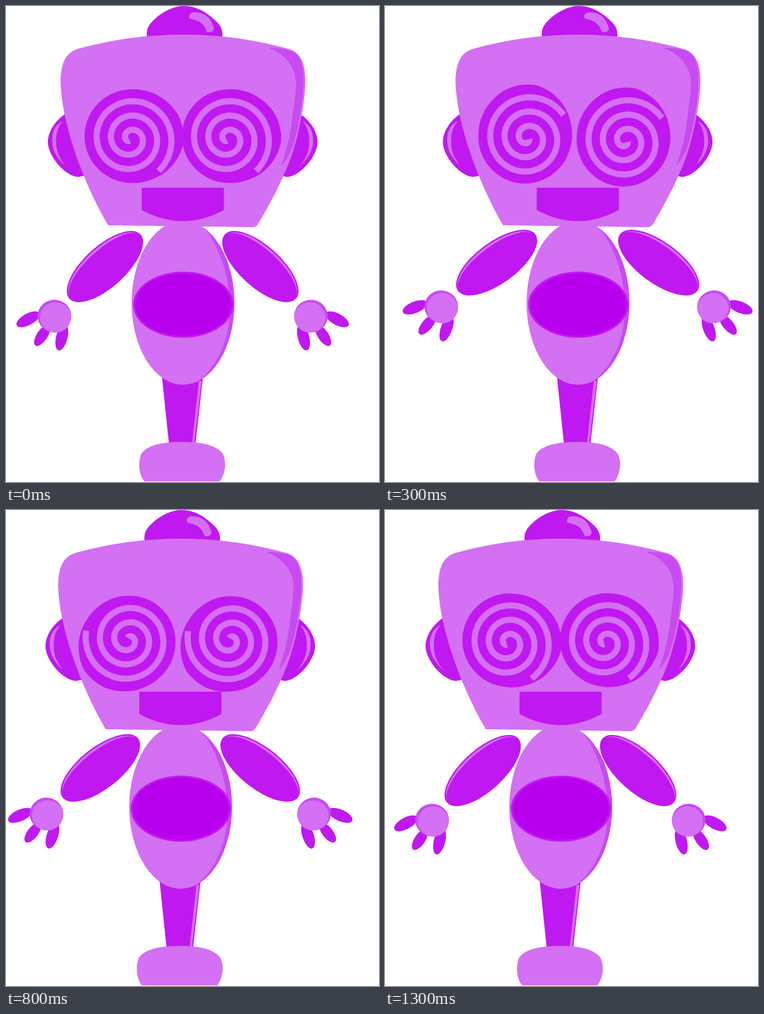
Animation, 588 px wide and 749 px high, one loop 1.35 s. Source, as an HTML page with a canvas:

```html
<!DOCTYPE html>
<html lang="en">
<head>
<meta charset="utf-8">
<title>Dizzy robot</title>
<style>
  html, body { margin: 0; width: 100%; height: 100%; overflow: hidden; background: #fff; }
  canvas { display: block; }
</style>
</head>
<body>
<canvas id="stage" width="588" height="749"></canvas>
<script>
const ctx = document.getElementById('stage').getContext('2d');
const LIGHT = '#d470f3', SHADE = '#c84af2', DARK = '#c018f0', BELLY = '#b800ee';
const LOOP = 1350, STEP = 50;
const RAD = Math.PI / 180;
const MIRROR = 557; // the robot is symmetric about x = MIRROR / 2

// Sideways sway as [time, offset]
const SWAY = [[0, 0], [200, 16.6], [300, 25.2], [350, 26.4], [600, 9], [800, -3.8],
  [1000, -15.2], [1050, -15.1], [1150, -10.8], [1300, -2], [1350, 0]];

// Eye rim as [angle from the spiral's end, radius]
const RIM = [[-320, 72], [-283, 71.5], [-229, 73.2], [-193, 74], [-140, 75.3],
  [-103, 78.5], [-75, 82], [-45, 83.5], [-13, 78.5], [15, 74], [40, 72]];

const shapes = {
  dome: new Path2D('M222 48C221 36 225 29 234 21C248 8 264 0 281 0C299 0 315 9 328 21C338 30 342 36 341 48Z'),
  domeGlint: new Path2D('M290 20C287 15 290 10 297 10C315 10 324 20 328 36C326 41 322 42 317 41C312 28 306 23 290 20Z'),
  ear: new Path2D('M98 167C80 177 66 196 66 214C66 236 93 268 114 269L124 267L112 200Z'),
  earGlint: new Path2D('M90 181C76 187 72 201 73 215C74 229 82 242 94 252C84 240 79 228 79 214C79 199 82 189 90 181Z'),
  head: new Path2D('M161 345C135 301 111 243 99 198C92 172 86 142 86 117C87 91 93 73 115 67Q195 45 280 45Q365 45 447 68C465 74 473 92 472 122C471 152 462 200 452 230C440 267 416 312 398 342Q395 348 388 348Z'),
  headShade: new Path2D('M414 66C431 66 446 68 455 73C466 82 470 98 469 126C466 165 459 202 450 226Q442 243 434 251C443 226 449 200 452 171Q458 130 457 118C455 93 440 76 414 66Z'),
  mouth: new Path2D('M214 286H343.5V321Q311 338.500 279 338.500Q246 338.500 214 321Z'),
  bodyShade: new Path2D('M302 338C350 380 390 525 297 596H380V338Z'),
  leg: new Path2D('M245.500 580H311L298.500 690H257Z'),
  legGlint: new Path2D('M304 590H308.500L296.500 690H293Z'),
  foot: new Path2D('M218 748C209 737 208 719 213 705C222 691 246 686 278 686C309 686 332 691 342 705C348 718 346 736 337 748Z')
};

function fill(path, color) {
  ctx.fillStyle = color;
  ctx.fill(path);
}

function ellipse(x, y, rx, ry, color, degrees = 0) {
  ctx.beginPath();
  ctx.ellipse(x, y, rx, ry, degrees * RAD, 0, 2 * Math.PI);
  ctx.fillStyle = color;
  ctx.fill();
}

function scoped(draw) {
  ctx.save();
  draw();
  ctx.restore();
}

function bothSides(draw) {
  scoped(draw);
  scoped(() => {
    ctx.translate(MIRROR, 0);
    ctx.scale(-1, 1);
    draw();
  });
}

function sample(keys, t) {
  const i = Math.max(1, keys.findIndex(key => key[0] >= t));
  const [t0, a] = keys[i - 1], [t1, b] = keys[i];
  return a + (b - a) * (t - t0) / (t1 - t0);
}

function polarPath(from, to, radiusAt) {
  const path = new Path2D();
  for (let angle = from; angle <= to; angle += 5) {
    const radius = radiusAt(angle);
    path.lineTo(radius * Math.cos(angle * RAD), radius * Math.sin(angle * RAD));
  }
  return path;
}

const rim = polarPath(-320, 40, angle => sample(RIM, angle));
const spiral = polarPath(-1020, 0, angle => 67.6 + 22.6 * angle / 360);

function drawEye(x, y, dx, dy, turn) {
  scoped(() => {
    ctx.translate(x, y);
    ctx.rotate(-turn * RAD);
    ctx.translate(dx, dy);
    ctx.rotate(49 * RAD);
    fill(rim, DARK);
    ctx.translate(1.2, 2.1);
    ctx.strokeStyle = LIGHT;
    ctx.lineWidth = 9.6;
    ctx.stroke(spiral);
  });
}

function drawArm(lift) {
  ctx.translate(214, 356);
  ctx.rotate(lift * RAD);
  ctx.translate(-214, -356);

  ellipse(156, 410, 75.5, 32.5, DARK, -42);
  scoped(() => {
    ctx.translate(156, 410);
    ctx.rotate(-42 * RAD);
    ctx.beginPath();
    ctx.ellipse(0, 0, 73, 30.3, 0, Math.PI, 2 * Math.PI);
    ctx.ellipse(0, 0, 73, 26.8, 0, 2 * Math.PI, Math.PI, true);
    ctx.fillStyle = LIGHT;
    ctx.fill();
  });

  ellipse(35, 493, 20.5, 9, DARK, -28);
  ellipse(57, 518.5, 19, 8.5, DARK, 124);
  ellipse(88, 521, 21.5, 9, DARK, 104);
  ellipse(76.3, 488, 26.5, 25.7, SHADE);
  ellipse(78, 490, 24.5, 23.7, LIGHT);
}

function drawBody() {
  fill(shapes.leg, DARK);
  fill(shapes.legGlint, LIGHT);
  fill(shapes.foot, LIGHT);
  ellipse(279, 467, 81, 129, LIGHT);
  scoped(() => {
    ctx.beginPath();
    ctx.ellipse(279, 467, 81, 129, 0, 0, 2 * Math.PI);
    ctx.clip();
    fill(shapes.bodyShade, SHADE);
  });
  ellipse(279.5, 470, 79, 52, DARK);
  ellipse(279.5, 470, 75.5, 49, BELLY);
}

function drawHead(turn) {
  fill(shapes.dome, DARK);
  fill(shapes.domeGlint, LIGHT);
  bothSides(() => {
    fill(shapes.ear, DARK);
    fill(shapes.earGlint, LIGHT);
  });
  fill(shapes.head, LIGHT);
  fill(shapes.headShade, SHADE);
  drawEye(197, 206.5, 0, 0, turn);
  drawEye(354, 208, -3.5, -1.5, turn);
  fill(shapes.mouth, DARK);
}

function render(t) {
  const lift = 9.75 * Math.max(0, 1 - Math.abs(t - 500) / 500);
  ctx.fillStyle = '#fff';
  ctx.fillRect(0, 0, 588, 749);
  scoped(() => {
    ctx.translate(sample(SWAY, t), 0);
    drawBody();
    bothSides(() => drawArm(lift));
    drawHead(t * 0.271);
  });
}

const start = performance.now();
function tick() {
  const t = (performance.now() - start) % LOOP;
  render(Math.floor(t / STEP) * STEP);
  requestAnimationFrame(tick);
}
tick();
</script>
</body>
</html>
```
